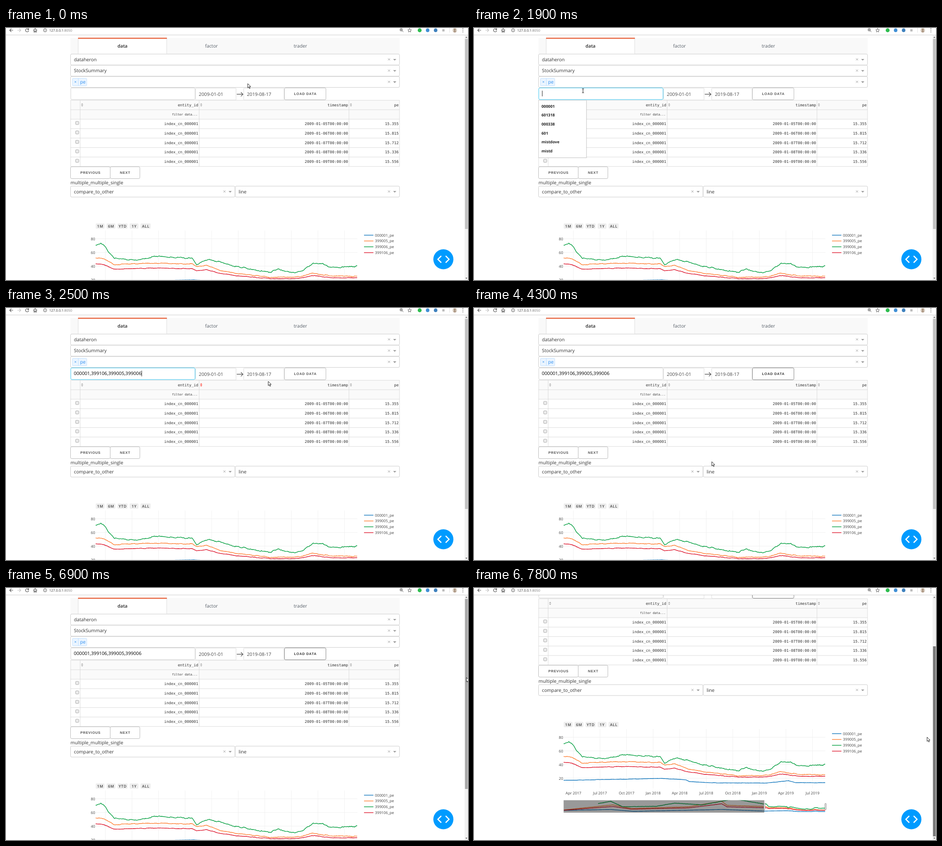
Write an HTML page that moves like this. It is 1013 px wide and 553 px high and loops after 8 s.

```html
<!DOCTYPE html>
<html lang="en">
<head>
<meta charset="utf-8">
<title>Stock data dashboard</title>
<style>
html, body { margin: 0; width: 100%; height: 100%; overflow: hidden; background: #fff; }
svg { display: block; width: 1013px; height: 553px; }
text { font: 10.25px "Open Sans", "Noto Sans", sans-serif; fill: #333; text-rendering: geometricPrecision; white-space: pre; }
.mid { text-anchor: middle; }
.end { text-anchor: end; }
.mono { font: 8.3px "DejaVu Sans Mono", monospace; }
.hint { font-size: 6.67px; }
.tab { fill: #586069; }
.on { font-weight: 600; font-size: 10px; fill: #222; }
.btn { font: 600 7.56px "Liberation Sans", Arial, sans-serif; letter-spacing: .69px; fill: #555; }
.tick { font-size: 8.24px; fill: #444; }
.range { font-size: 8.24px; font-weight: 600; letter-spacing: .69px; fill: #444; }
.item { font: 600 8.5px "Noto Sans", sans-serif; fill: #222; }
.url { font-size: 7.4px; }
.date { fill: #484848; }
.tag { fill: #2f8ff0; }
.typed { fill: #000; }
.line { fill: none; stroke-linejoin: round; vector-effect: non-scaling-stroke; }
</style>
</head>
<body>
<svg viewBox="0 0 1013 553"></svg>
<script>
const svg = document.querySelector('svg');
const text = (x, y, s, cls = '', extra = '') => `<text x="${x}" y="${y}" class="${cls}" ${extra}>${s}</text>`;
const rect = (x, y, w, h, fill, stroke = 'none', r = 0, extra = '') =>
  `<rect x="${x}" y="${y}" width="${w}" height="${h}" fill="${fill}" stroke="${stroke}" rx="${r}" ${extra}/>`;
const path = (d, stroke, w = 1, fill = 'none', extra = '') =>
  `<path d="${d}" fill="${fill}" stroke="${stroke}" stroke-width="${w}" ${extra}/>`;
const dot = (x, y, r, fill) => `<circle cx="${x}" cy="${y}" r="${r}" fill="${fill}"/>`;
const ring = (x, y, r) => `<circle cx="${x}" cy="${y}" r="${r}" fill="none" stroke="#555"/>`;
const cross = (x, y, r, color) => path(`M${x - r} ${y - r}l${2 * r} ${2 * r}m0 ${-2 * r}l${-2 * r} ${2 * r}`, color, .9);
const times = (n, f) => Array.from({ length: n }, (_, i) => f(i)).join('');

const select = (x, y, w, value) => {
  const right = x + w, mid = y + 12;
  return rect(x, y, w, 24, '#fff', '#ccc', 2.5) + text(x + 7.5, y + 15.6, value) +
    cross(right - 23, mid - .3, 2.3, '#999') +
    path(`M${right - 14} ${mid - 1.3}h7l-3.5 3.6z`, 'none', 0, '#999');
};
const button = (x, y, w, label, id = '') =>
  `<g id="${id}">${rect(x, y, w, 26, '#fff', '#bbb', 2.6)}${text(x + w / 2 + .3, y + 15.7, label, 'btn mid')}</g>`;
const sorter = (x, id = '') =>
  path(`M${x - 2.4} 168l2.4 -2.8l2.4 2.8zM${x - 2.4} 169.4h4.8l-2.4 2.8z`, 'none', 0, '#aaa', `id="${id}"`);

function form() {
  const dateBox = (x, s) => rect(x, 132, 88.5, 26, '#fff', '#dcdcdc', 1) + text(x + 7, 149.4, s, 'date');
  return rect(141.5, 22, 721.5, 35, '#f9f9f9') + rect(158, 22, 194.6, 35, '#fff') +
    path('M158.3 22V56.5M352.4 22V56.5', '#d6d6d6', .8) + rect(158, 21.4, 194.8, 2.2, '#e4572e') +
    text(255.5, 43.2, 'data', 'on mid') + text(450.5, 43.2, 'factor', 'tab mid') + text(645.5, 43.2, 'trader', 'tab mid') +
    ['dataheron', 'StockSummary', ''].map((s, i) => select(141.5, 57.2 + 24.6 * i, 721.3, s)).join('') +
    rect(145.8, 110.4, 31.2, 16.4, '#ebf5ff', '#c2e0ff', 1.5) + path('M158.6 110.4v16.4', '#c2e0ff') +
    cross(152.2, 118.3, 1.6, '#2f8ff0') + text(162.6, 122.2, 'pe', 'tag') +
    rect(142, 131.5, 272.5, 25.5, '#fff', '#d1d1d1', 2.6, 'id="input"') + text(148.8, 147.3, '', 'typed', 'id="value"') +
    path('M0 137.5v12.5', '#222', 1, 'none', 'id="caret"') +
    dateBox(415.8, '2009-01-01') + dateBox(521.2, '2019-08-17') +
    path('M506 145.4h13.6m-4.6 -4.4l4.6 4.4l-4.6 4.4', '#484848', 1.1) + button(610.5, 131.5, 91, 'LOAD DATA', 'load');
}

function table() {
  const top = 158.6, step = 20.75, right = [421.6, 750, 861];
  const row = (y, cells) => cells.map((s, i) => text(right[i], y, s, 'mono end')).join('');
  return rect(141.8, top, 721, step * 2, '#fafafa') +
    times(8, i => path(`M141.5 ${top + i * step}H863`, '#d3d3d3', .8)) +
    [141.8, 162.6, 423.5, 752, 862.8].map(x => path(`M${x} ${top}v${step * 7}`, '#d3d3d3', .8)).join('') +
    sorter(167) + sorter(428, 'sort') + sorter(756.3) +
    row(171.8, ['entity_id', 'timestamp', 'pe']) + text(420, 192.2, 'filter data...', 'mono hint end') +
    ['15.355', '15.815', '15.712', '15.336', '15.556'].map((pe, i) => {
      const y = 213.1 + i * step;
      return rect(152.6, y - 8.2, 7, 7, '#ececec', '#a5a5a5', 1.4, 'stroke-width=".9"') +
        row(y, ['index_cn_000001', `2009-01-0${5 + i}T00:00:00`, pe]);
    }).join('');
}

const random = n => { const v = Math.sin(n * 127.1 + 3.7) * 43758.5453; return (v - Math.floor(v)) * 2 - 1; };

// Joins key points with straight trends and adds seeded wobble, fine and coarse.
function series(keys, rough, seed) {
  let d = '', k = 0;
  for (let x = keys[0][0], i = 0; x <= 770; x += 2, i++) {
    while (x > keys[k + 1][0]) k++;
    const [[x0, y0], [x1, y1]] = keys.slice(k, k + 2);
    const wobble = rough * (.5 * random(i + seed) + random(Math.floor(i / 4) + seed));
    d += `${i ? 'L' : 'M'}${x} ${(y0 + (y1 - y0) * (x - x0) / (x1 - x0) + wobble).toFixed(1)}`;
  }
  return d;
}

// Heights are local to a group shifted down by 135. The trends reach back before
// the visible window; the slider below shows the same lines squeezed.
function chart() {
  const broad = [[-1700, 409], [-1234, 351], [-1060, 393], [-520, 372], [-208, 309], [-156, 356],
    [197, 369], [215, 371], [236, 384], [330, 381], [408, 383], [418, 388], [440, 386], [470, 397],
    [505, 403], [577, 412], [645, 411], [671, 403], [712, 409], [770, 410]];
  const growth = [[-1376, 335], [-1256, 309], [-1143, 372], [-825, 367], [-652, 330], [-394, 351], [-92, 282],
    [197, 342], [207, 338], [217, 343], [224, 355], [238, 370], [289, 375], [325, 366], [408, 370], [418, 384],
    [445, 372], [500, 387], [579, 401], [597, 394], [627, 402], [650, 398], [673, 382], [695, 383], [712, 391], [770, 388]];
  const large = [[-1700, 414], [-1256, 404], [-1040, 425], [-200, 404], [197, 422], [412, 418],
    [465, 421], [472, 425], [520, 427.5], [640, 428], [690, 423], [705, 427], [770, 427.5]];
  const lines = [
    ['000001', '#1277bd', large, .25],
    ['399005', '#ff7f32', broad, .7],
    ['399006', '#06a042', growth, 1.3],
    ['399106', '#de1a30', broad.map(([x, y]) => [x, y * .75 + 106]), .6]
  ];
  const plots = lines.map(([, color, keys, rough], i) =>
    `<path class="line" d="${series(keys, rough, i * 2000)}" stroke="${color}" stroke-width="1.4"/>`).join('');

  let left = 196.7;
  const ranges = ['1M', '6M', 'YTD', '1Y', 'ALL'].map(s => {
    const w = s.length > 2 ? 22 : 19.2, x = left;
    left += w + 4.7;
    return rect(x, 293.8, w, 11.6, '#eee', 'none', 2) + text(x + w / 2 + .3, 302.5, s, 'range mid');
  }).join('');
  const columns = times(10, i => {
    const x = 218 + 58.25 * i, month = ['Apr', 'Jul', 'Oct', 'Jan'][i % 4];
    return path(`M${x} 309.5V439.5`, '#eee', .8) + text(x, 453.2, `${month} ${2017 + Math.floor((i + 1) / 4)}`, 'tick mid');
  });
  const rows = [20, 40, 60, 80].map(v => {
    const y = 447.5 - 1.5 * v;
    return path(`M196.5 ${y}H770.5`, '#eee', .8) + text(195.5, y + 3, v, 'tick end');
  }).join('');
  const legend = lines.map(([code, color], i) => {
    const y = 319.6 + i * 12.8;
    return path(`M785 ${y}h20.6`, color, 1.4) + text(809, y + 3, code + '_pe', 'tick');
  }).join('');
  const handle = x => rect(x, 472.8, 2.6, 13.6, '#fff', '#666', .7, 'stroke-width=".8"');

  return `<g transform="translate(0 135)">${ranges}${columns}${rows}
    <g clip-path="url(#window)">${plots}</g>${legend}
    <g clip-path="url(#slider)"><g transform="translate(637 489.5) scale(.232 .19) translate(-197 -422)">${plots}</g></g>
    ${rect(196.5, 465.7, 440, 27.3, 'rgba(0,0,0,.4)')}${handle(635.5)}${handle(769.5)}</g>`;
}

function suggestions() {
  return '<g id="list">' + rect(142, 159.6, 105.4, 126, 'rgba(0,0,0,.1)') + rect(141.4, 158.6, 105.2, 126, '#fff', '#c4c4c4', 0, 'stroke-width=".8"') +
    ['000001', '601318', '000338', '601', 'mistdove', 'mistd'].map((s, i) => text(148, 174.6 + i * 19.7, s, 'item')).join('') + '</g>';
}

function toolbar() {
  const ink = '#555';
  return rect(0, 0, 1013, 15.4, '#fff') + path('M0 15.3H1013', '#c8c8c8', .9) +
    path('M15.5 5H8.2m3.4 -3.5L8.1 5l3.5 3.5', ink, 1.2) + path('M25 5h7.3m-3.4 -3.5L32.4 5l-3.5 3.5', '#c4c4c4', 1.2) +
    path('M49 2.7A3.5 3.5 0 1 0 49.7 6M49.6 .8v3h-3', ink, 1.2) + path('M59.8 5.2L64 1.4l4.2 3.8M61.3 4.8v4.2h1.8V6.3h1.8V9h1.8V4.8', ink, 1.1) +
    ring(85.7, 5, 3.5) + path('M85.7 4.6v2.3M85.7 2.8v.9', ink, .9) +
    text(94.8, 7.8, '127.0.0.1<tspan fill="#777">:8050</tspan>', 'url') +
    ring(866.6, 4, 2.7) + path('M868.6 6l2.7 2.8M865.2 4h2.8M866.6 2.6v2.8', ink, .9) +
    path('M885 1l1.2 2.7l2.9 .3l-2.2 2l.6 2.8l-2.5 -1.4l-2.5 1.4l.6 -2.8l-2.2 -2l2.9 -.3z', ink, .9) +
    dot(907, 5, 4.3, '#2dbd4e') + dot(924.5, 5, 3.9, '#3f8fd6') + dot(942, 5, 3.9, '#3d80bd') + rect(956.6, 2.6, 5, 5, '#bbb') +
    path('M972.5 0v10', '#ddd', .8) + dot(984, 5, 4.9, '#d9cfc2') + dot(984, 4, 2.2, '#a58d78') + path('M980.6 8.3q3.4 -3.6 6.8 0q-3.4 2.6 -6.8 0z', 'none', 0, '#a58d78') +
    times(3, i => dot(1001.8, 1.4 + 3.6 * i, .85, ink));
}

svg.innerHTML = `<defs>
    <clipPath id="window">${rect(196.5, 309, 574, 131, '#000')}</clipPath>
    <clipPath id="slider">${rect(196.5, 465.7, 574, 27.3, '#000')}</clipPath>
  </defs>
  <g id="page">${form()}${table()}
    ${button(141.5, 304.5, 87, 'PREVIOUS')}${button(228.5, 304.5, 65, 'NEXT')}
    ${text(141.5, 342.8, 'multiple_multiple_single')}
    ${select(141.5, 347, 360.5, 'compare_to_other')}${select(502.6, 347, 360.2, 'line')}
    ${chart()}${suggestions()}</g>
  ${toolbar()}
  ${dot(959, 507.5, 22, '#009bff')}
  ${path('M954.4 500.2l-7.4 7.4l7.4 7.4M964 500.2l7.4 7.4l-7.4 7.4', '#fff', 2.5)}
  ${rect(1005.6, 15.8, 7.4, 537.2, '#f1f1f1')}
  ${path('M1007.4 21.4h4l-2 -2.4zM1007.4 548h4l-2 2.4z', 'none', 0, '#505050')}
  ${rect(1006.4, 24, 6, 417, '#c1c1c1', 'none', 0, 'id="thumb"')}
  ${path('M0 0V9.3L2.2 7.3L3.7 10.8L5.2 10.1L3.7 6.7H6.6Z', '#111', .9, '#fff', 'id="arrow"')}
  ${path('M-2 0q2 0 2 1.2q0 -1.2 2 -1.2M0 1V8.4M-2 9.4q2 0 2 -1.2q0 1.2 2 1.2', '#111', 1, 'none', 'id="beam"')}`;

const $ = id => document.getElementById(id);
const set = (id, name, value) => $(id).setAttribute(name, value);
const show = (id, on) => set(id, 'visibility', on ? 'visible' : 'hidden');
const clamp = v => Math.min(1, Math.max(0, v));

// Swings out to the right and back to the input, then crosses to the button;
// after that it jumps along the scrollbar.
function pointer(t) {
  if (t >= 7800) return [993.4, 327.2];
  if (t >= 7200) return [1009, 216.6];
  if (t >= 6900) return [1009.6, 196.6];
  if (t >= 6600) return [1009.6, 228.8];
  if (t >= 4300) return [521.4, 337.2];
  const tick = Math.floor(t / 100);
  const reach = clamp((tick - 10) / 8), leave = clamp((tick - 20) / 5), swing = Math.sin(Math.PI * reach);
  return [530 - 291 * reach + 230 * swing + 336 * leave, 122 + 11 * reach + 20 * swing + 28 * leave];
}

function draw() {
  const t = performance.now() % 8000;
  const beam = t >= 1500 && t < 2500;
  show('arrow', !beam);
  show('beam', beam);
  set(beam ? 'beam' : 'arrow', 'transform', `translate(${pointer(t)})`);

  const focused = t >= 1800 && t < 4300, pasted = t >= 2100, loaded = t >= 4300;
  set('input', 'stroke', focused ? '#33c3f0' : '#d1d1d1');
  $('value').textContent = pasted ? '000001,399106,399005,399006' : '';
  show('caret', focused);
  set('caret', 'transform', `translate(${pasted ? 297.6 : 149.7} 0)`);
  show('list', t >= 1900 && !pasted);
  set('sort', 'fill', t >= 2500 && !loaded ? '#ff4136' : '#aaa');
  $('load').firstChild.setAttribute('stroke', loaded ? '#888' : '#bbb');
  $('load').lastChild.style.fill = loaded ? '#333' : '#555';

  const scroll = t < 7200 ? 0 : t < 7800 ? 8 : 135;
  set('page', 'transform', `translate(0 ${-scroll})`);
  set('thumb', 'y', 24 + scroll * .77);
  set('thumb', 'fill', t < 6600 ? '#c1c1c1' : t < 7200 ? '#a8a8a8' : '#787878');
  requestAnimationFrame(draw);
}
draw();
</script>
</body>
</html>
```
